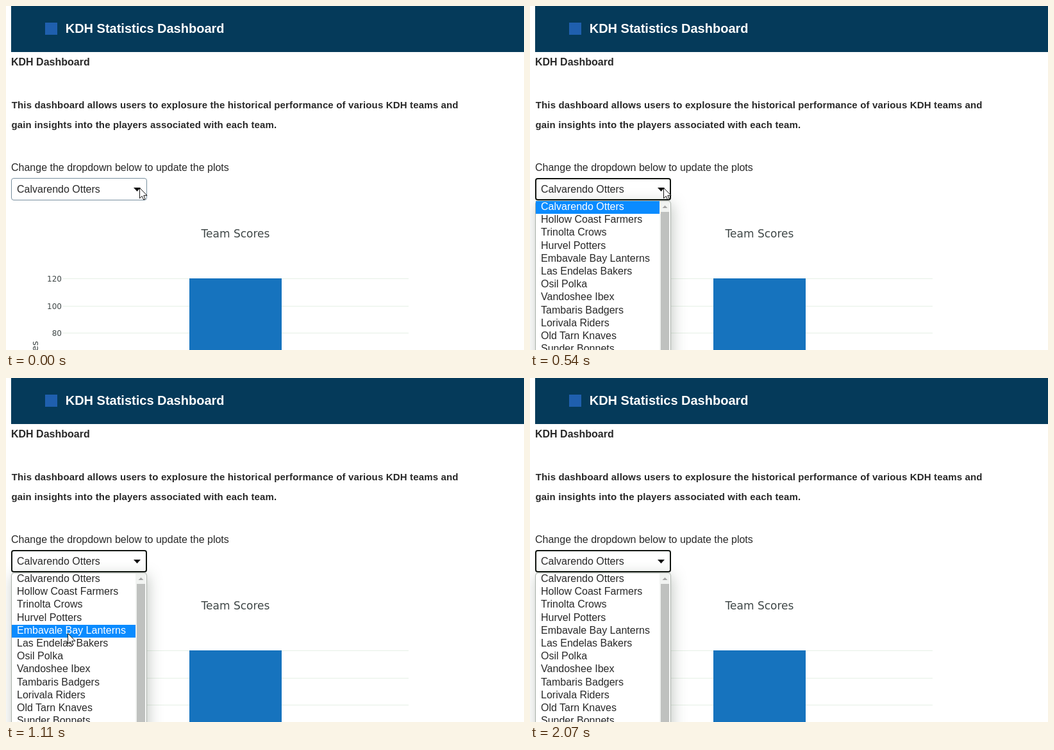
Animation, 808 px wide and 538 px high, one loop 3240 ms. Source, as an HTML page:

```html
<!DOCTYPE html>
<html lang="en">
<head>
<meta charset="utf-8">
<title>Statistics Dashboard</title>
<style>
  html, body { margin: 0; width: 100%; height: 100%; overflow: hidden; background: #fff; }
  svg { display: block; width: 808px; height: 538px; cursor: default; }
  text { font: 16px "Liberation Sans", Arial, sans-serif; fill: #282828; white-space: pre; }
  .bold { font-weight: bold; }
  .title { font-size: 20px; fill: #fff; }
  .intro { font-size: 15px; letter-spacing: 0.155px; }
  .chart text { font-family: "DejaVu Sans", Verdana, sans-serif; font-size: 12px; fill: #404848; }
  .chart .head { font-size: 17px; text-anchor: middle; }
  .chart .axis { font-size: 14px; }
  .end { text-anchor: end; }
  rect { shape-rendering: crispEdges; }
  .round { shape-rendering: auto; }
  #popup { filter: drop-shadow(2px 4px 11px rgba(20, 40, 20, .26)); }
</style>
</head>
<body>
<svg viewBox="0 0 808 538">
  <rect x="8" width="800" height="72" fill="#053a5a"/>
  <rect x="61" y="26" width="19" height="19" fill="#1f5fae"/>
  <text class="bold title" x="92.7" y="42">KDH Statistics Dashboard</text>

  <text class="bold" x="8" y="93">KDH Dashboard</text>
  <text class="bold intro" x="8.7" y="160">This dashboard allows users to explosure the historical performance of various KDH teams and</text>
  <text class="bold intro" x="8.4" y="191">gain insights into the players associated with each team.</text>
  <text x="8" y="258">Change the dropdown below to update the plots</text>

  <g class="chart">
    <text class="head" x="358" y="362">Team Scores</text>
    <g id="grid"></g>
    <rect x="286" y="426" width="144" height="112" fill="#1673be"/>
    <text class="axis end" transform="translate(50 524) rotate(-90)">Scores</text>
  </g>

  <rect id="box" class="round" fill="#fff"/>
  <text id="choice" x="17" y="292"></text>
  <path d="M199 284h11l-5.5 6z" fill="#111"/>

  <g id="menu">
    <path id="popup" d="M8.5 570V309q0-4 4-4h203q4 0 4 4v261z" fill="#fff" stroke="#a9b0a9"/>
    <rect x="202" y="306" width="16" height="232" fill="#f1f3f1"/>
    <path d="M206.5 316h8l-4-4z" fill="#a3a3a3"/>
    <rect x="204" y="322" width="13" height="216" fill="#bfc1bf"/>
    <rect id="mark" x="9" width="193" height="20" fill="#0a8bff"/>
    <g id="list"></g>
  </g>

  <path id="pointer" d="M.5 .5V16.8L4.2 13.3L6.7 19L9.2 17.9L6.8 12.3H12z"
        fill="#fff" stroke="#111" stroke-linejoin="round"/>
</svg>
<script>
const LOOP = 3240, OPEN = 480, ROW = 20.2, TOP = 305.3;
const teams = [
  "Calvarendo Otters", "Hollow Coast Farmers", "Trinolta Crows", "Hurvel Potters",
  "Embavale Bay Lanterns", "Las Endelas Bakers", "Osil Polka", "Vandoshee Ibex",
  "Tambaris Badgers", "Lorivala Riders", "Old Tarn Knaves", "Sunder Bonnets"
];
// pointer path: time, x, y
const path = [
  [690, 208, 284], [780, 190, 305], [1020, 103, 379],
  [1200, 90, 419], [1260, 85, 437], [1590, 68, 552]
];

const $ = id => document.getElementById(id);

function add(parent, tag, attrs, text = "") {
  const el = document.createElementNS("http://www.w3.org/2000/svg", tag);
  set(el, attrs);
  el.textContent = text;
  parent.append(el);
  return el;
}

function set(el, attrs) {
  for (const k in attrs) el.setAttribute(k, attrs[k]);
}

[120, 100, 80].forEach((value, i) => {
  const y = Math.round(426 + 42.5 * i);
  add($("grid"), "rect", { x: 89, y, width: 539, height: 1, fill: "#e6f0e6" });
  add($("grid"), "text", { x: 87, y: y + 5, class: "end" }, value);
});

$("choice").textContent = teams[0];
const rows = teams.map((name, i) =>
  add($("list"), "text", { x: 17, y: Math.round(319 + ROW * i) }, name));

function pointerAt(t) {
  if (t <= path[0][0]) return path[0].slice(1);
  const i = path.findIndex(p => p[0] > t);
  if (i < 0) return path[path.length - 1].slice(1);
  const [a, b] = [path[i - 1], path[i]];
  const k = (t - a[0]) / (b[0] - a[0]);
  return [1, 2].map(j => Math.round(a[j] + (b[j] - a[j]) * k));
}

function draw(t) {
  const open = t >= OPEN;
  const [x, y] = pointerAt(t);
  set($("box"), open
    ? { x: 9, y: 270, width: 210, height: 33, rx: 3, stroke: "#101410", "stroke-width": 2 }
    : { x: 8.5, y: 269.5, width: 211, height: 34, rx: 3.5, stroke: "#7890a0", "stroke-width": 1 });
  $("menu").style.display = open ? "" : "none";

  const active = Math.max(0, Math.floor((y - TOP) / ROW));
  set($("mark"), { y: Math.round(TOP + ROW * active) });
  rows.forEach((row, i) => { row.style.fill = i === active ? "#fff" : ""; });
  set($("pointer"), { transform: `translate(${x} ${y})` });
}

const start = performance.now();
function tick() {
  draw((performance.now() - start) % LOOP);
  requestAnimationFrame(tick);
}
tick();
</script>
</body>
</html>
```
